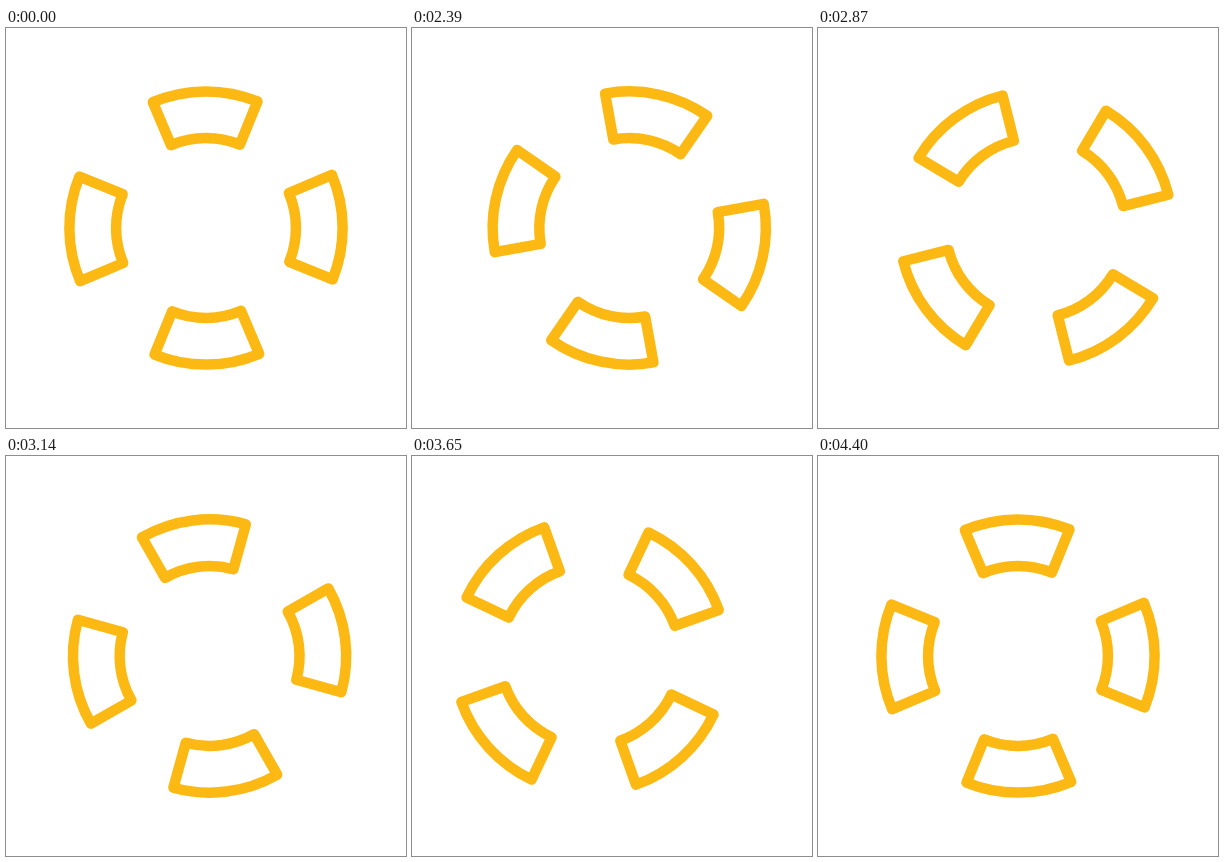
Write an HTML page that moves like this. It is 400 px wide and 400 px high and loops after 4.49 s.

```html
<!DOCTYPE html>
<html lang="en">
<head>
<meta charset="utf-8">
<title>Rolling ring</title>
<style>
  html, body { margin: 0; height: 100%; overflow: hidden; background: #fff; }
  svg { display: block; width: 100%; height: 100%; }
</style>
</head>
<body>
<svg viewBox="0 0 400 400">
  <defs>
    <path id="segment" d="M-52.3 -126.2A136.6 136.6 0 0 1 52.3 -126.2L34.4 -83.1A90 90 0 0 0 -34.4 -83.1Z"/>
  </defs>
  <g id="ring" fill="none" stroke="#fdb913" stroke-width="10.5" stroke-linejoin="round">
    <use href="#segment"/>
    <use href="#segment" transform="rotate(90)"/>
    <use href="#segment" transform="rotate(180)"/>
    <use href="#segment" transform="rotate(270)"/>
  </g>
</svg>
<script>
  const LOOP = 4490, START = 2000, DURATION = 2400, STEP = 30;
  const SWING = 24, TILT = -0.4;
  const ring = document.getElementById('ring');

  const clamp = v => Math.min(1, Math.max(0, v));
  const ease = v => v * v * (3 - 2 * v);
  const phase = (p, from, to) => ease(clamp((p - from) / (to - from)));

  function draw(now) {
    // Motion advances in 30 ms steps after the opening pause.
    const elapsed = Math.floor((now % LOOP - START) / STEP) * STEP;
    const p = clamp(elapsed / DURATION);
    const shift = SWING * (phase(p, 0, 0.25) - 2 * phase(p, 0.25, 0.75) + phase(p, 0.75, 1));
    const angle = TILT + 180 * ease(p);
    ring.setAttribute('transform', `translate(${200 + shift} 200) rotate(${angle})`);
  }

  let origin;
  function tick(now) {
    origin ??= now;
    draw(now - origin);
    requestAnimationFrame(tick);
  }
  draw(0);
  requestAnimationFrame(tick);
</script>
</body>
</html>
```
